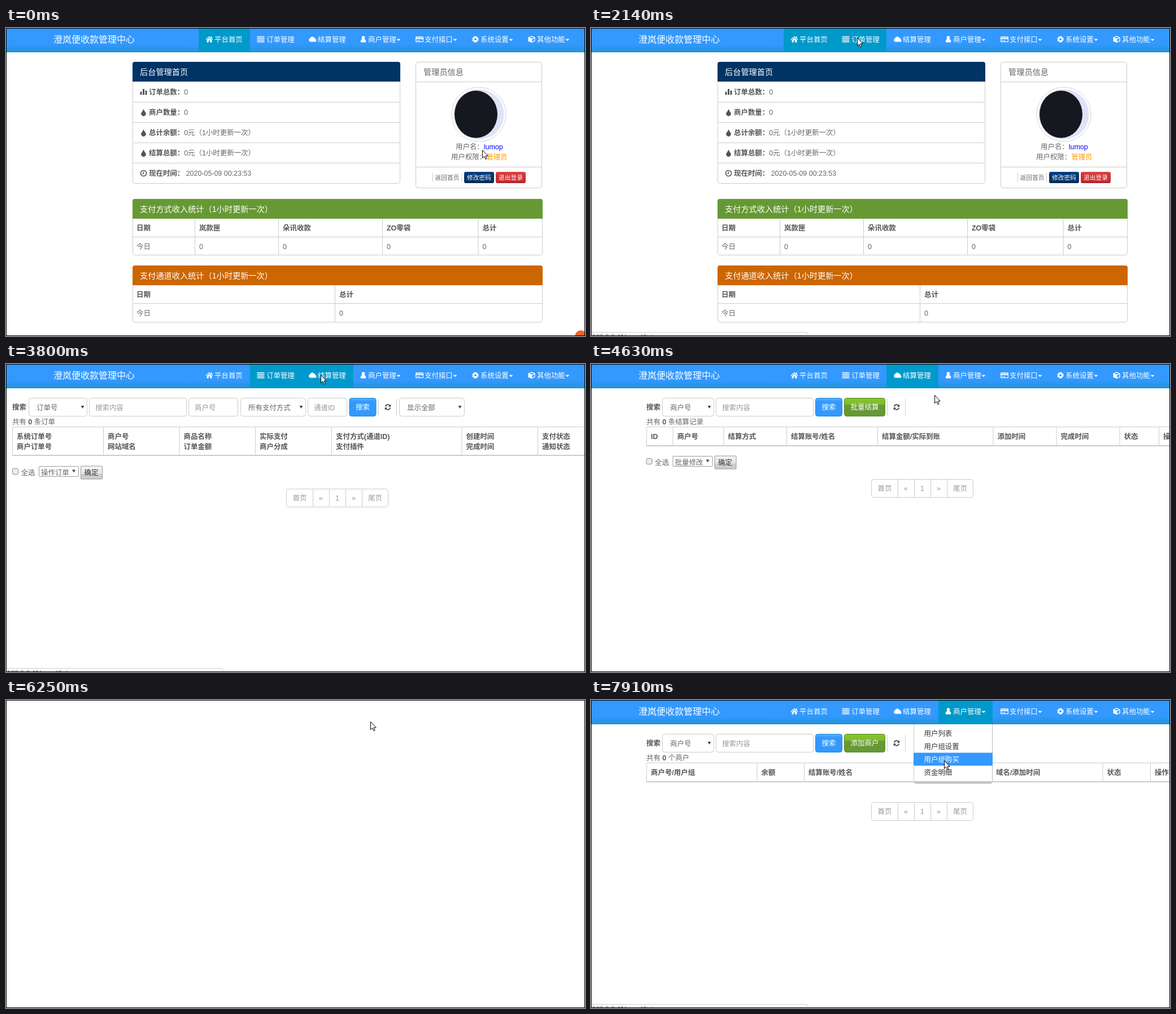
An HTML page that plays this animation: 1025x546 px, repeating every 8000 ms.

```html
<!DOCTYPE html>
<html lang="zh-CN">
<head>
<meta charset="utf-8">
<title>管理中心</title>
<style>
html, body { margin: 0; width: 100%; height: 100%; overflow: hidden; background: #fff; }
svg { display: block; width: 100%; height: 100%; }
text {
  font: 12.45px "Liberation Sans", "Noto Sans CJK SC", "Noto Sans CJK JP", sans-serif;
  fill: #666; white-space: pre;
}
.b { font-weight: 700; fill: #555; }
.w { fill: #fff; font-weight: 500; }
.ph { fill: #999; }
.dark { fill: #333; }
.mid { text-anchor: middle; }
.head { font-size: 14.2px; }
.brand { font-size: 16px; }
.small { font-size: 10.7px; }
.tip { font-size: 12px; }

/* stepped timeline, 8 s per loop */
.k, #cursor { animation: 8s step-end infinite; }
.k { visibility: hidden; }
#cursor { animation-name: cursor; }
@keyframes home { 0% { visibility: visible } 32% { visibility: hidden } }
@keyframes corner { 0% { visibility: visible } 11.125% { visibility: hidden } }
@keyframes orderForm { 32% { visibility: visible } 52.5% { visibility: hidden } }
@keyframes orderList { 37.25% { visibility: visible } 52.5% { visibility: hidden } }
@keyframes settle { 52.5% { visibility: visible } 78.125% { visibility: hidden } }
@keyframes shop { 83.5%, 100% { visibility: visible } }
@keyframes tabOrder { 26.75% { visibility: visible } 52.5% { visibility: hidden } }
@keyframes tabSettle { 42.125% { visibility: visible } 78.125% { visibility: hidden } }
@keyframes tabShop { 62.875%, 100% { visibility: visible } }
@keyframes menu { 67.875% { visibility: visible } 78.125% { visibility: hidden } 93.625%, 100% { visibility: visible } }
@keyframes item1 { 72.875% { visibility: visible } 78.125% { visibility: hidden } }
@keyframes item2 { 93.625% { visibility: visible } 98.875% { visibility: hidden } }
@keyframes item3 { 98.875%, 100% { visibility: visible } }
@keyframes tip {
  26.75% { visibility: visible } 32% { visibility: hidden }
  47.5% { visibility: visible } 52.5% { visibility: hidden }
  67.875% { visibility: visible } 78.125% { visibility: hidden }
  88.375%, 100% { visibility: visible }
}
@keyframes tipOut {
  32% { visibility: visible } 37.25% { visibility: hidden }
  52.5% { visibility: visible } 57.875% { visibility: hidden }
}
@keyframes blank { 78.125% { visibility: visible } 83.5% { visibility: hidden } }
@keyframes cursor {
  0% { transform: translate(843px, 216px) }
  1.25% { transform: translate(674px, 184px) }
  6.125% { transform: translate(591px, 184px) }
  11.125% { transform: translate(590px, 180px) }
  16.5% { transform: translate(591px, 180px) }
  21.5% { transform: translate(501px, 65px) }
  26.75% { transform: translate(471px, 17px) }
  32% { transform: translate(545px, 90px) }
  42.125% { transform: translate(553px, 23px) }
  47.5% { transform: translate(557px, 19px) }
  52.5% { transform: translate(585px, 52px) }
  57.875% { transform: translate(608px, 55px) }
  62.875% { transform: translate(650px, 20px) }
  67.875% { transform: translate(643px, 40px) }
  72.875% { transform: translate(630px, 55px) }
  78.125% { transform: translate(645px, 38px) }
  83.5% { transform: translate(651px, 21px) }
  88.375% { transform: translate(662px, 15px) }
  93.625% { transform: translate(640px, 79px) }
  98.875%, 100% { transform: translate(625px, 107px) }
}
</style>
</head>
<body>
<svg id="stage" viewBox="0 0 1025 546" xmlns="http://www.w3.org/2000/svg"></svg>
<script>
// y is the vertical middle of the text line
const text = (x, y, s, cls = '', drop = 4.6) => `<text x="${x}" y="${y + drop}" class="${cls}">${s}</text>`;
const head = (x, y, s, cls = 'w') => text(x, y, s, 'head ' + cls, 5.3);
const rect = (x, y, w, h, fill, rx = 0, more = '') =>
  `<rect x="${x}" y="${y}" width="${w}" height="${h}" rx="${rx}" fill="${fill}" ${more}/>`;
const box = (x, y, w, h, rx = 4, line = '#ccc', fill = '#fff') =>
  rect(x + .5, y + .5, w - 1, h - 1, fill, rx, `stroke="${line}"`);
const hline = (x, y, w, h = 1) => rect(x, y, w, h, '#ccc');
const vline = (x, y, h) => rect(x, y, 1, h, '#ccc');
const path = (d, fill = '#fff', more = '') => `<path d="${d}" fill="${fill}" ${more}/>`;
const at = (x, y, s) => `<g transform="translate(${x} ${y})">${s}</g>`;
const timed = (name, s) => `<g class="k" style="animation-name:${name}">${s}</g>`;
const cap = (x, y, w, h, fill) => path(`M${x} ${y + h}V${y + 4}q0-4 4-4H${x + w - 4}q4 0 4 4V${y + h}z`, fill);
const grad = (id, ...stops) => `<linearGradient id="${id}" x2="0" y2="1">` +
  stops.map(([o, c]) => `<stop offset="${o}" stop-color="${c}"/>`).join('') + '</linearGradient>';

const defs = `<defs>
${grad('bar', [0, '#3a8ff0'], [.08, '#3399ff'], [.65, '#3399ff'], [1, '#2294dd'])}
${grad('blue', [0, '#5cb0ff'], [.2, '#3399ff'], [1, '#3399ff'])}
${grad('green', [0, '#88c02e'], [.32, '#7fbf2e'], [.4, '#669933'], [1, '#669933'])}
${grad('navy', [0, '#003f86'], [.5, '#003366'], [1, '#003366'])}
${grad('red', [0, '#dd4444'], [.4, '#cc3333'], [1, '#cc2a33'])}
${grad('grey', [0, '#f6f6f6'], [.55, '#e4e4e4'], [.65, '#cccccc'], [1, '#cccccc'])}
</defs>`;

// ---- icons, centred on 0,0
const icon = {
  home: path('M-6.5 .3L0-5.5L2.7-3V-5H4.5V-1.5L6.5 .3L5.6 1.2L0-3.7L-5.6 1.2zM-4.5 1.5L0-2.5L4.5 1.5V5.5H1.3V2H-1.3V5.5H-4.5z'),
  list: [-4.5, -1.5, 1.5, 4.5].map(y => rect(-6.5, y - .8, 13, 1.6, '#fff')).join(''),
  cloud: path('M-4 4.5a3.2 3.2 0 0 1-.8-6.2a4 4 0 0 1 7.4-1a2.7 2.7 0 0 1 2.5 2.6a2.4 2.4 0 0 1-.6 4.6z'),
  user: path('M0-6a2.9 3.1 0 0 1 1.7 5.6Q4.8 .8 4.8 4Q4.8 5.5 3.5 5.5H-3.5Q-4.8 5.5-4.8 4Q-4.8 .8-1.7-.4A2.9 3.1 0 0 1 0-6z'),
  card: path('M-5.5-5H5.5q1.5 0 1.5 1.5V3.5q0 1.5-1.5 1.5H-5.5Q-7 5-7 3.5V-3.5Q-7-5-5.5-5zM-5.8-3.5V-2.5H5.8V-3.5zM-5.8-.3V3.7H5.8V-.3zM-4.8 2H-2.8V3H-4.8zM-1.8 2H1.2V3H-1.8z', '#fff', 'fill-rule="evenodd"'),
  gear: '<circle r="3.2" fill="none" stroke="#fff" stroke-width="2.6"/><circle r="4.9" fill="none" stroke="#fff" stroke-width="2" stroke-dasharray="2.1 1.75"/>',
  cube: path('M0-6L6-3.6V3.4L0 6L-6 3.4V-3.6zM0-4.6L-4-3L0-1.4L4-3zM.8 4.2L4.7 2.5V-1.8L.8-.2z', '#fff', 'fill-rule="evenodd"'),
  bars: rect(-6, -.5, 3, 5.5, '#555') + rect(-1.5, -5.5, 3, 10.5, '#555') + rect(3, -2.5, 3, 7.5, '#555'),
  drop: path('M0-6Q1 -3 3.2 -.2A4.2 4.2 0 1 1-3.2 -.2Q-1 -3 0-6z', '#555'),
  clock: '<circle r="5.1" fill="none" stroke="#555" stroke-width="1.5"/>' +
    path('M0-3V.7H-2.6', 'none', 'stroke="#555" stroke-width="1.3"'),
  reload: path('M-4.3-1A4.4 4.4 0 0 1 3.4-2.8M4.3 1A4.4 4.4 0 0 1-3.4 2.8', 'none', 'stroke="#444" stroke-width="1.8"') +
    path('M5.3-5.3V-.8H.9zM-5.3 5.3V.8H-.9z', '#444'),
};

// ---- navigation
const tabs = [
  ['home', 360, 369, '平台首页'], ['list', 451, 461, '订单管理'], ['cloud', 543, 552, '结算管理'],
  ['user', 632.5, 641, '商户管理', 1], ['card', 732, 741, '支付接口', 1],
  ['gear', 831, 840, '系统设置', 1], ['cube', 930.5, 940, '其他功能', 1],
];
const tabFill = (name, x, w) => timed(name, rect(x, 1, w, 41, '#0099cc'));
const nav = rect(1, 1, 1023, 41, 'url(#bar)') +
  tabFill('home', 341, 91) + tabFill('tabOrder', 432, 91) + tabFill('tabSettle', 523, 92) + tabFill('tabShop', 615, 96) +
  rect(1, 42, 1023, 1, '#178acc') +
  text(84, 19.5, '澄岚便收款管理中心', 'brand w', 6) +
  tabs.map(([i, ix, x, s, more]) => at(ix, 20, icon[i]) + text(x, 20, s, 'w') +
    (more ? path(`M${x + 50.5} 19.5h7l-3.5 3.5z`) : '')).join('');

// ---- home page
const panel = (x, y, w, h, fill, title) => box(x, y, w, h) + cap(x, y, w, 35, fill) + head(x + 13, y + 17.5, title);
const row = (y, i, label, value) => at(243.5, y, icon[i]) +
  text(253, y, `<tspan class="b">${label}：</tspan>${value}`);
const stats = (y, cols) => hline(224, y + 67, 725) + cols.map(([x, s, v], i) =>
  (i ? vline(x - 8, y + 35, 65) : '') + text(x, y + 51.5, s, 'b') + text(x, y + 84, v)).join('');
const smallBtn = (x, w, fill, s) => rect(x, 255, w, 20, fill, 3) +
  rect(x + 1, 273, w - 2, 1.5, '#000', 0, 'opacity=".25"') + text(x + w / 2, 265, s, 'small w mid', 4);

const home = panel(224, 60, 474, 216, '#003366', '后台管理首页') +
  [131, 167, 203, 239].map(y => hline(224, y, 474)).join('') +
  row(113.5, 'bars', '订单总数', '0') + row(149.5, 'drop', '商户数量', '0') +
  row(185.5, 'drop', '总计余额', '0元（1小时更新一次）') +
  row(221.5, 'drop', '结算总额', '0元（1小时更新一次）') +
  row(257.5, 'clock', '现在时间', ' 2020-05-09 00:23:53') +
  box(725, 60, 224, 224) + hline(725, 95, 224) + head(739, 78, '管理员信息', '') +
  '<circle cx="837" cy="153" r="48" fill="#fff" stroke="#bbb" stroke-dasharray="2 1"/>' +
  '<circle cx="837" cy="153" r="44.5" fill="#e0e2f8"/><ellipse cx="832" cy="153" rx="38" ry="42" fill="#16181f"/>' +
  text(796, 210.5, '用户名：<tspan fill="#00f">lumop</tspan>') +
  text(788, 228, '用户权限：<tspan fill="#f90">管理员</tspan>') +
  hline(725, 246, 224) + vline(755, 257, 16) + vline(806, 257, 16) + text(781, 265, '返回首页', 'small mid', 4) +
  smallBtn(811, 53, 'url(#navy)', '修改密码') + smallBtn(867, 53, 'url(#red)', '退出登录') +
  panel(224, 303, 726, 100, '#669933', '支付方式收入统计（1小时更新一次）') +
  stats(303, [[231, '日期', '今日'], [342, '岚款匣', 0], [490, '朵讯收款', 0], [674, 'ZO零袋', 0], [843.5, '总计', 0]]) +
  panel(224, 421, 726, 101, '#cc6600', '支付通道收入统计（1小时更新一次）') +
  stats(421, [[231, '日期', '今日'], [590, '总计', 0]]);

// ---- list pages
const arrow = (x, y) => path(`M${x - 3} ${y - 2.5}h6l-3 5z`, '#444');
const input = (x, w, s) => box(x, 60, w, 33) + text(x + 11, 77, s, 'ph');
const select = (x, w, s) => box(x, 60, w, 33) + text(x + 14, 77, s) + arrow(x + w - 8.5, 76.5);
const button = (x, w, fill, line, s) => box(x, 60, w, 33, 4, line, `url(#${fill})`) + text(x + w / 2, 76.5, s, 'w mid');
const reload = x => vline(x, 62, 29) + vline(x + 32, 62, 29) + at(x + 17, 76.5, icon.reload);
const count = (x, s) => text(x, 102, `共有 <tspan class="b">0</tspan> ${s}`);
const table = (x, h, cols) => hline(x, 111, 1024 - x) + hline(x, 110 + h, 1024 - x, 2) +
  cols.map(([tx, ...lines]) => vline(tx - 8, 111, h) +
    lines.map((s, i) => text(tx, 128 + 18 * i, s, 'b')).join('')).join('');
const bulk = (x, y, s) => box(x, y - 7, 11, 11, 2, '#888', '#eee') + text(x + 15.5, y, '全选') +
  box(x + 47, y - 11, 71, 19, 1, '#999') + text(x + 51, y, s) + arrow(x + 109, y - 2) +
  box(x + 121, y - 11.5, 39, 24, 1, '#999', 'url(#grey)') + text(x + 127.5, y + .3, '确定', 'dark');
const pager = y => box(496, y, 181, 33) + [543, 572, 601, 630].map(x => vline(x, y, 33)).join('') +
  [[520, '首页'], [557.5, '«'], [586.5, '1'], [615.5, '»'], [653.5, '尾页']]
    .map(([x, s]) => text(x, y + 16.5, s, 'ph mid')).join('');

const orderForm = text(11, 76, '搜索', 'b') + select(40, 104, '订单号') + input(147, 173, '搜索内容') +
  input(323, 88, '商户号') + select(415, 116, '所有支付方式') + input(534, 70, '通道ID') +
  button(607.5, 48, 'blue', '#178acc', '搜索') + reload(659) + select(696, 116, '显示全部');
const orderList = count(11, '条订单') + table(11, 51, [
  [19, '系统订单号', '商户订单号'], [180, '商户号', '网站域名'], [314.5, '商品名称', '订单金额'],
  [449, '实际支付', '商户分成'], [584, '支付方式(通道ID)', '支付插件'],
  [814.5, '创建时间', '完成时间'], [949, '支付状态', '通知状态']]) +
  bulk(11, 192, '操作订单') + pager(221);

const sideForm = s => text(98, 76, '搜索', 'b') + select(126, 92, '商户号') + input(221, 173, '搜索内容') +
  button(397, 48, 'blue', '#178acc', '搜索') + button(448, 73, 'green', '#5a8a2c', s) + reload(524);
const settle = sideForm('批量结算') + count(98, '条结算记录') + table(98, 34, [
  [106, 'ID'], [152.5, '商户号'], [242.5, '结算方式'], [354, '结算账号/姓名'], [515, '结算金额/实际到账'],
  [719.5, '添加时间'], [831.5, '完成时间'], [943.5, '状态'], [1013, '操作']]) +
  bulk(97.5, 174, '批量修改') + pager(204);
const shop = sideForm('添加商户') + count(98, '个商户') + table(98, 34, [
  [106, '商户号/用户组'], [301.5, '余额'], [385, '结算账号/姓名'], [580.5, '联系方式'],
  [717, '域名/添加时间'], [913.5, '状态'], [998, '操作']]) + pager(181);

// ---- drop-down menu
const items = ['用户列表', '用户组设置', '用户组购买', '资金明细'];
const menu = rect(571.5, 140, 139, 8.5, '#c4c4c4', 4) + rect(571, 43, 140, 101, '#fff') +
  rect(571, 43, 1, 102, '#ccc') + rect(710, 43, 1, 102, '#bbb') +
  items.map((s, i) => text(589.5, 59 + 23 * i, s, 'dark')).join('') +
  items.slice(0, 3).map((s, i) => timed('item' + (i + 1),
    rect(571, 47.7 + 22.9 * i, 140, 22.9, '#3399ff') + text(589.5, 59 + 23 * i, s, 'w'))).join('');

const address = '192.0.2.41/panel/list';
const tip = path('M0 539.5H380q4 0 4 4V546H0z', '#fff', 'stroke="#ccc"') + text(2, 545, address, 'tip', 6.5);
const tipOut = `<g opacity=".5">${text(2, 546.3, address, 'tip', 6.5)}</g>`;

document.getElementById('stage').innerHTML = defs + rect(0, 0, 1025, 546, '#fff') +
  timed('home', home) + timed('orderForm', orderForm) + timed('orderList', orderList) +
  timed('settle', settle) + timed('shop', shop) + nav + timed('menu', menu) +
  timed('tip', tip) + timed('tipOut', tipOut) +
  timed('corner', '<circle cx="1018" cy="547" r="11" fill="#f4602a"/>') +
  timed('blank', rect(0, 0, 1025, 546, '#fff')) +
  '<g id="cursor">' + path('M.5 .5V14.6L3.7 11.7L6.1 16.8L8.2 15.8L5.9 10.9H10.2z', '#fff', 'stroke="#000"') + '</g>' +
  rect(.5, .5, 1024, 545, 'none', 0, 'stroke="#000"');
</script>
</body>
</html>
```
